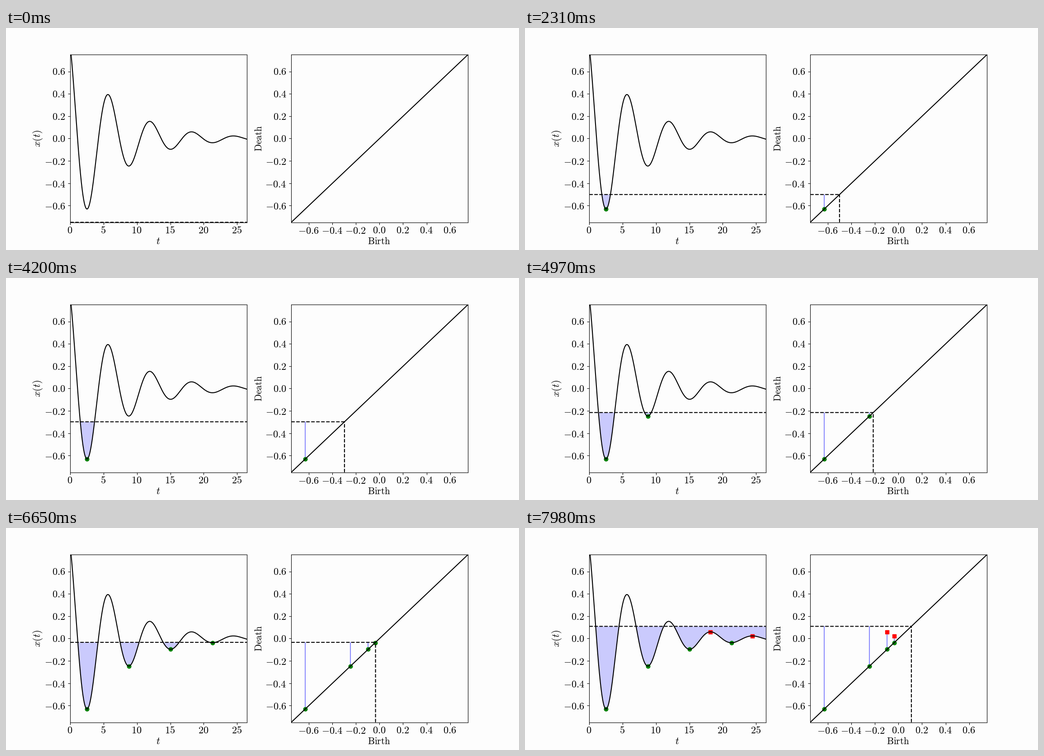
Recreate the animation shown at these times as a matplotlib script. Size 1135 px wide and 493 px high, loop 8000 ms.

```python
import numpy as np
import matplotlib.pyplot as plt
from matplotlib.animation import FuncAnimation

W, H, DPI = 1135, 493, 100
LOOP_MS, STEPS = 8000, 115
LIM, T_END = 0.75, 26.5
LEVELS = np.linspace(-LIM, LIM, 200)
BG = "#fdfdfd"
TOP, BOTTOM = 59.5, 431.5
LEFT_BOX = (142.3, 533.2)
RIGHT_BOX = (631.1, 1021.7)
FONT_SIZE = 16
TICKS = [k / 5 for k in range(-3, 4)]
T_TICKS = range(0, 30, 5)
T_LIM, V_LIM = (0, T_END), (-LIM, LIM)

# Damped oscillation: DEPTH is the depth of the first trough, at time T_MIN
DECAY, OMEGA, PHASE, DEPTH = 0.15, 1.002, 0.485, 0.631
EXTREMUM = np.pi - np.arctan(DECAY / OMEGA)
T_MIN = (EXTREMUM - PHASE) / OMEGA
HALF_PERIOD = np.pi / OMEGA
AMP = -DEPTH / (np.exp(-DECAY * T_MIN) * np.cos(EXTREMUM))


def signal(t):
    return AMP * np.exp(-DECAY * t) * np.cos(OMEGA * t + PHASE)


plt.rcParams["mathtext.fontset"] = "cm"
fig = plt.figure(figsize=(W / DPI, H / DPI), dpi=DPI, facecolor=BG)


def label(x, y, text, size=FONT_SIZE, ha="center", va="baseline", **kw):
    """Place math text at a pixel position measured from the top left."""
    fig.text(x / W, 1 - y / H, f"${text}$", fontsize=size, ha=ha, va=va, **kw)


def make_axes(box, xlim, xticks, fmt, baseline):
    x0, x1 = box
    ax = fig.add_axes([x0 / W, 1 - BOTTOM / H, (x1 - x0) / W, (BOTTOM - TOP) / H],
                      facecolor=BG)
    ax.set(xlim=xlim, ylim=V_LIM, xticks=xticks, yticks=TICKS)
    ax.tick_params(labelbottom=False, labelleft=False)
    for v in TICKS:
        y = BOTTOM - (v + LIM) / (2 * LIM) * (BOTTOM - TOP)
        label(x0 - 10.8, y + (8.8 if v < 0 else 7.6), f"{v:.1f}", ha="right")
    for v in xticks:
        x = x0 + (v - xlim[0]) / (xlim[1] - xlim[0]) * (x1 - x0)
        label(x - 0.9, baseline + (v < 0), fmt.format(v))
    return ax


wave_ax = make_axes(LEFT_BOX, T_LIM, [t for t in T_TICKS if t < T_END], "{:d}", 455.5)
pair_ax = make_axes(RIGHT_BOX, V_LIM, TICKS, "{:.1f}", 456.2)

label(337, 480, "t")
label(825, 480, r"\mathrm{Birth}", 15.3)
label(83.5, 245.5, "x(t)", rotation=90, ha="right", va="center")
label(569.5, 245.5, r"\mathrm{Death}", 15.3, rotation=90, ha="right", va="center")

t = np.linspace(0, T_END, 1500)
x = signal(t)

# Each trough is born at its own height and dies at the crest before it;
# the deepest one never dies
t_birth = T_MIN + 2 * HALF_PERIOD * np.arange(4)
t_death = t_birth + HALF_PERIOD * np.array([1, -1, 1, 1])
birth, death = signal(t_birth), signal(t_death)
death[0] = LIM

wave_ax.plot(t, x, "k", lw=1.5, zorder=3)
pair_ax.plot(V_LIM, V_LIM, "k", lw=1.5, zorder=3)
fill, = wave_ax.fill([0], [0], color="blue", alpha=0.2, lw=0, zorder=1)
bars, = pair_ax.plot([], [], color="blue", alpha=0.45, lw=1.5, zorder=1,
                     solid_capstyle="butt")


def markers(ax, shape, color):
    return ax.plot([], [], shape, color=color, ms=6.2, mew=1, zorder=2)[0]


def dashes(ax):
    return ax.plot([], [], "k--", lw=1.5, zorder=4, snap=False)[0]


wave_births, pair_births = (markers(a, "o", "green") for a in (wave_ax, pair_ax))
wave_deaths, pair_deaths = (markers(a, "s", "red") for a in (wave_ax, pair_ax))
wave_level, pair_level, pair_drop = (dashes(a) for a in (wave_ax, pair_ax, pair_ax))


def update(step):
    level = LEVELS[step]
    wave_level.set_data(T_LIM, (level, level))
    pair_level.set_data((-LIM, level), (level, level))
    pair_drop.set_data((level, level), (-LIM, level))

    # Area under the level and above the curve
    floor = np.minimum(x, level)
    fill.set_xy(np.column_stack([np.r_[t, T_END, 0], np.r_[floor, level, level]]))

    born, dead = birth <= level, death <= level
    wave_births.set_data(t_birth[born], birth[born])
    pair_births.set_data(birth[born], birth[born])
    wave_deaths.set_data(t_death[dead], death[dead])
    pair_deaths.set_data(birth[dead], death[dead])

    tops = np.minimum(death[born], level)
    gap = np.full(tops.size, np.nan)
    bars.set_data(np.repeat(birth[born], 3),
                  np.column_stack([birth[born], tops, gap]).ravel())
    return ()


anim = FuncAnimation(fig, update, frames=STEPS, interval=LOOP_MS / STEPS,
                     repeat=True, repeat_delay=0, cache_frame_data=False)
plt.show()
```
